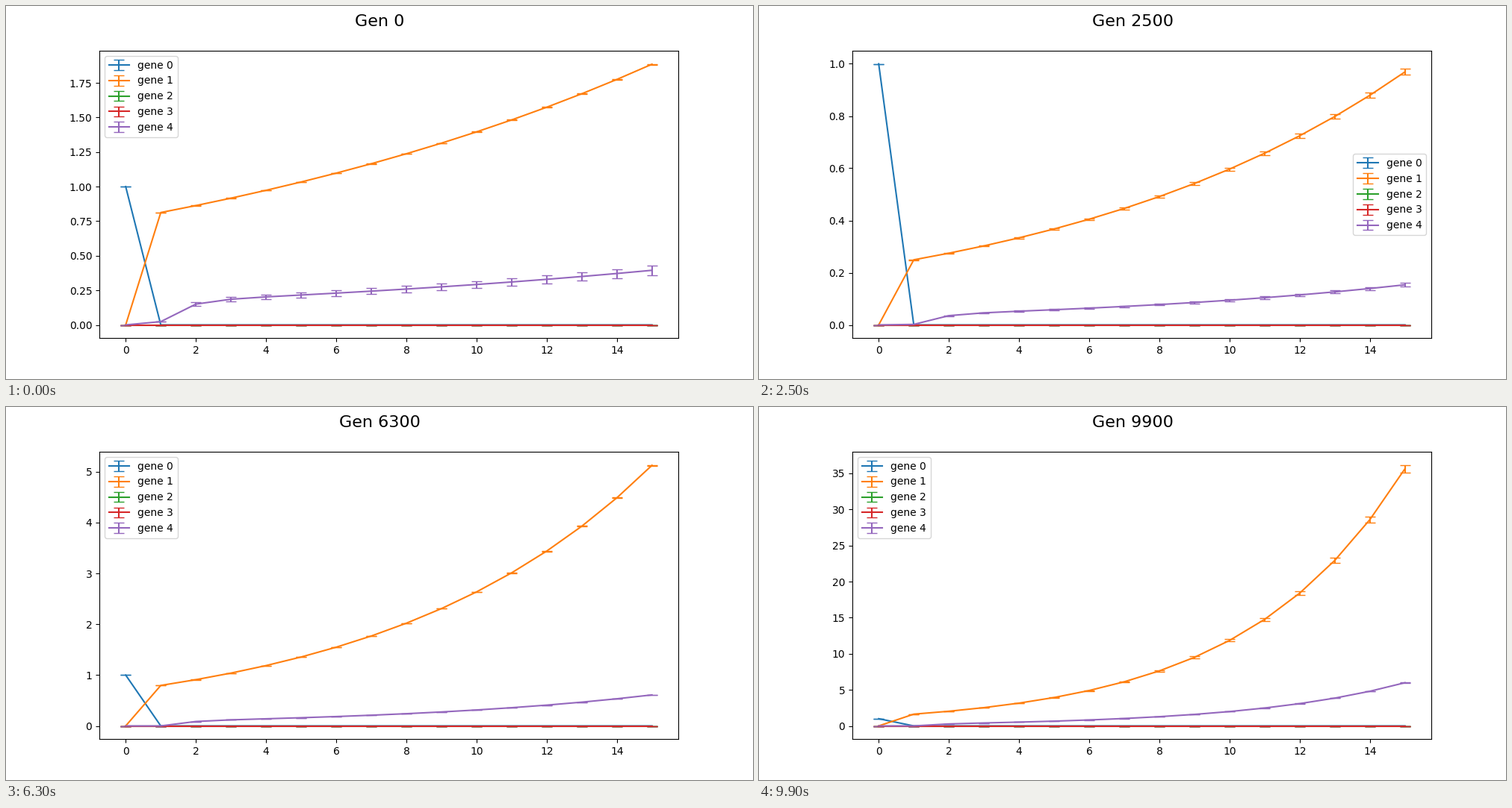
Animation of 1000x500 px, one loop 10 s. Source, as a matplotlib script:

```python
import numpy as np
import matplotlib.pyplot as plt
from matplotlib.animation import FuncAnimation

FRAMES = 100
STEP_MS = 100
GENES = 5
x = np.arange(16)


def track(i, *points):
    """Value at step i on straight lines through (step, value) points."""
    return np.interp(i, *zip(*points))


def peak(i):
    """Final level of gene 1; it grows and shrinks exponentially."""
    return track(i, (0, 1.885), (8, 1.22), (15, 1.7985), (23, 0.98),
                 (39, 0.8929), (54, 2.67), (63, 5.125), (66, 1.9),
                 (77, 28.48), (94, 18), (99, 35.64))


def log_peak(i):
    lo, hi = np.floor(i), np.ceil(i)
    return np.log(peak(lo)) + (i - lo) * np.log(peak(hi) / peak(lo))


def growth(i):
    return track(i, (0, 0.0601), (15, 0.1168), (39, 0.0692), (54, 0.1322),
                 (63, 0.133), (77, 0.2458), (99, 0.2203))


def share(i):
    """Level of gene 4 as a part of gene 1."""
    return track(i, (0, 0.2095), (39, 0.13), (63, 0.119), (77, 0.081), (99, 0.168))


def spread(i):
    """Relative errors of genes 1 and 4: waves, plus an early decay for gene 4."""
    wave = np.sin(np.pi * track(i, (0, 0), (38, 1), (64, 2), (110, 3))) ** 2
    first = 0.0015 + (0.0135 if i < 38 else 0.0295) * wave
    return first, 0.086 * np.exp(-(i / 27) ** 2) + 0.45 * first


def levels(i):
    """Mean and error of every gene along x."""
    mean = np.zeros((GENES, x.size))
    dev = np.zeros_like(mean)
    mean[0, 0] = 1
    n = x[1:]
    mean[1, 1:] = np.exp(log_peak(i) + growth(i) * (n - 15))
    early = max(0, 0.14 * (1 - i / 39)) if i > 20 else 0.14
    mean[4, 1:] = share(i) * mean[1, 1:] * (1 - (1 - early) * 0.195 ** (n - 1))
    err1, err4 = spread(i)
    dev[1] = mean[1] * err1 * (x / 15) ** 0.4
    dev[4] = mean[4] * err4
    return mean, dev


fig, ax = plt.subplots(figsize=(10, 5), dpi=100)
title = fig.suptitle("", fontsize=16, y=0.978)
zero = np.zeros(x.size)
bars = [ax.errorbar(x, zero, yerr=zero, capsize=5, label=f"gene {g}")
        for g in range(GENES)]
ax.legend(loc="best")


def draw(i):
    mean, dev = levels(i)
    for bar, y, d in zip(bars, mean, dev):
        line, caps, stems = bar
        low, high = y - d, y + d
        line.set_ydata(y)
        caps[0].set_ydata(low)
        caps[1].set_ydata(high)
        stems[0].set_segments([[(a, b), (a, c)] for a, b, c in zip(x, low, high)])
    top = (mean + dev).max()
    ax.set_ylim(-0.05 * top, 1.05 * top)
    title.set_text(f"Gen {i * 100}")
    return []


anim = FuncAnimation(fig, draw, frames=FRAMES, interval=STEP_MS,
                     repeat=True, repeat_delay=0)
plt.show()
```
